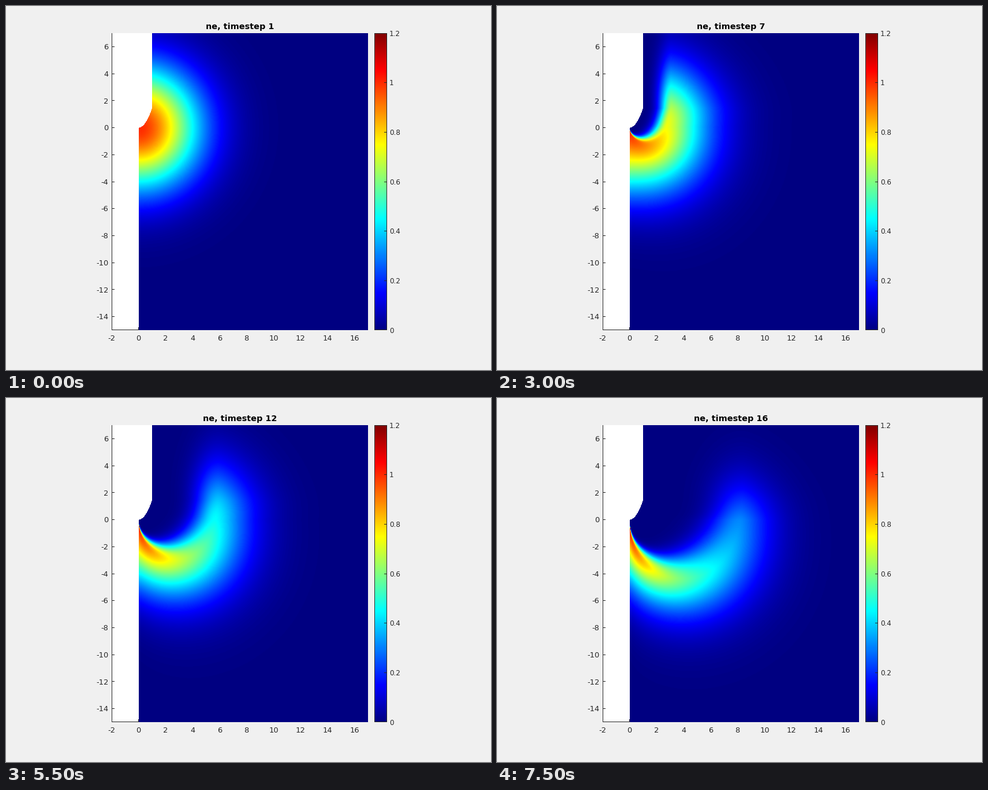
Write a matplotlib script that moves like this. It is 840 px wide and 630 px high and loops after 8000 ms.

```python
import numpy as np
import matplotlib.pyplot as plt
from matplotlib.animation import FuncAnimation
from matplotlib.patches import Rectangle

W, H, DPI = 840, 630, 100
STEPS, INTERVAL = 16, 500
LEFT, RIGHT, TOP, BOTTOM = 183, 627, 47, 561
XMIN, XMAX, YMIN, YMAX = -2, 17, -15, 7
VMAX = 1.2
INK = "#262626"


def jet(v):
    """Piecewise linear jet colours in 256 levels for v in 0..1."""
    v = (np.floor(np.clip(v, 0, 0.9999) * 256) + 0.5) / 256
    return np.stack([np.clip(1.5 - np.abs(4 * v - c), 0, 1) for c in (3, 2, 1)], -1)


def px(x):
    return LEFT + (x - XMIN) * (RIGHT - LEFT) / (XMAX - XMIN)


def py(y):
    return BOTTOM - (y - YMIN) * (BOTTOM - TOP) / (YMAX - YMIN)


# Pixel centres in data units
cols = XMIN + (np.arange(RIGHT - LEFT) + 0.5) * (XMAX - XMIN) / (RIGHT - LEFT)
rows = YMAX - (np.arange(BOTTOM - TOP) + 0.5) * (YMAX - YMIN) / (BOTTOM - TOP)
X, Y = np.meshgrid(cols, rows)
up = np.maximum(Y, 0)
wall = np.minimum(np.sqrt(up / 1.45), 1)
inside = X > wall

# Polar around the tip below it, horizontal distance above it
R = np.where(Y < 0, np.hypot(X, Y), np.maximum(X, 0))
theta = np.where(Y < 0, np.arctan2(np.maximum(X, 0), -Y), np.pi / 2)
turn = theta / (np.pi / 2)


def density(t):
    """Gaussian cloud pushed off the needle by a steadily growing field."""
    a = 3.25 * (t / 10) ** 1.56
    sink = 2 * (t / 15) ** 5
    reach = a * turn ** (0.8 + 0.8 * np.exp(-t / 4))
    gap = 2.1 * (1 - np.exp(-reach / 1.6)) + 0.17 * a * np.sin(2 * theta) * np.sin(theta)
    base = (reach ** 1.7 + wall ** 1.7) ** (1 / 1.7)
    crest = base + gap
    edge = base + 0.5 * a / (a + 1) * up * np.exp(-up)
    core = crest - wall * np.exp(-a / 0.8)
    peak = 1 / (1 + turn ** 1.5 * (t / 10) ** 2)

    steep = 2 + 1.5 * (1 - turn)
    drop = np.log(np.maximum(peak, 0.3) / 0.15) ** (1 / steep)
    rise = (crest - edge) / drop + 1e-6
    inner = np.exp(-(np.maximum(crest - R, 0) / rise) ** steep)
    fall = np.sqrt(20) * (1 + core) ** -0.25 * (1 + 0.024 * a * np.sin(2 * theta))
    power = 1.5 + 0.5 * np.exp(-core)
    outer = np.exp(-(np.maximum(R - core, 0) / fall) ** power)
    return peak * inner * outer * np.exp(-(up ** 2 + 2 * sink * up) / 20)


def picture(t):
    return np.dstack([jet(density(t) / VMAX), inside.astype(float)])


fig = plt.figure(figsize=(W / DPI, H / DPI), dpi=DPI, facecolor="#f0f0f0")
ax = fig.add_axes([0, 0, 1, 1])
ax.axis("off")


def text(x, y, s, size, **kw):
    kw = {"color": INK, "ha": "center", **kw}
    return ax.text(x, y, s, fontsize=size * 72 / DPI, family="DejaVu Sans",
                   va="baseline", **kw)


def line(x0, y0, x1, y1, z=2):
    """One pixel wide line, centred on whole pixels across its direction."""
    if x0 == x1:
        x0 = x1 = np.floor(x0) + 0.5
    else:
        y0 = y1 = np.floor(y0) + 0.5
    ax.plot([x0, x1], [y0, y1], color=INK, lw=72 / DPI, zorder=z,
            solid_capstyle="butt", snap=False)


ax.add_patch(Rectangle((LEFT, TOP), RIGHT - LEFT, BOTTOM - TOP, fc="white", lw=0, zorder=1))
line(LEFT, TOP, LEFT, BOTTOM)
line(LEFT, BOTTOM - 1, RIGHT, BOTTOM - 1)
for v in range(-2, 17, 2):
    line(px(v), BOTTOM, px(v), BOTTOM - 5)
    text(px(v), 579, str(v), 13)
for v in range(-14, 7, 2):
    line(LEFT, py(v), LEFT + 5, py(v))
    text(177.5, py(v) + 4.7, str(v), 13, ha="right")

# Colour bar
ramp = jet((np.arange(256) + 0.5) / 256)[::-1, None]
ax.imshow(ramp, extent=(638, 660, BOTTOM, TOP), interpolation="nearest",
          aspect="auto", zorder=3)
for x in (638, 659):
    line(x, TOP, x, BOTTOM, 4)
for y in (TOP, BOTTOM - 1):
    line(638, y, 660, y, 4)
for i in range(7):
    y = BOTTOM - (BOTTOM - TOP) * i / 6
    if 0 < i < 6:
        line(655, y, 660, y, 4)
    text(664, y + 4.8, f"{i / 5:g}", 12, ha="left")

field = ax.imshow(picture(0), extent=(LEFT, RIGHT, BOTTOM, TOP),
                  interpolation="nearest", aspect="auto", zorder=3)
title = text(405, 40, "", 14.4, color="black", weight="bold")
ax.set_xlim(0, W)
ax.set_ylim(H, 0)


def update(t):
    field.set_data(picture(t))
    title.set_text(f"ne, timestep {t + 1}")
    return field, title


anim = FuncAnimation(fig, update, frames=STEPS, interval=INTERVAL,
                     repeat=True, repeat_delay=0, blit=False)
plt.show()
```
